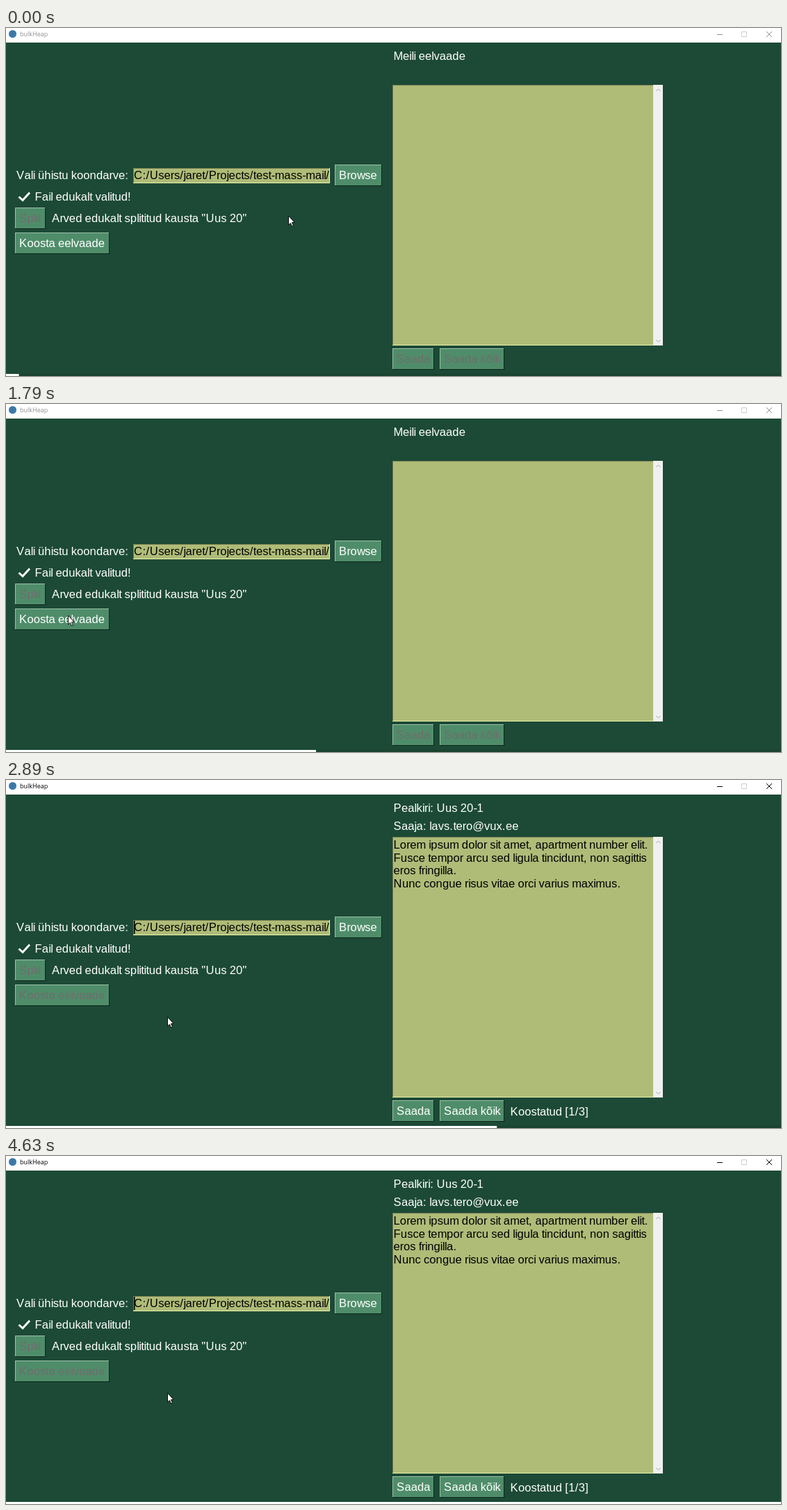
An HTML page with a canvas that plays this animation: 1115x502 px, repeating every 4.72 s.

```html
<!DOCTYPE html>
<html lang="et">
<head>
<meta charset="utf-8">
<title>bulkHeap</title>
<style>
html, body { margin: 0; width: 100%; height: 100%; overflow: hidden; background: #1c4a36; }
canvas { display: block; }
</style>
</head>
<body>
<canvas id="stage" width="1115" height="502"></canvas>
<script>
const ctx = document.getElementById('stage').getContext('2d');
const LOOP = 4720, FRAMES = 60, ZOOM = 1.035;
const FACE = '"Liberation Sans", Arial, sans-serif';
const BACK = '#1c4a36', FIELD = '#aebc78', BUTTON = '#4f8d6a', WHITE = '#fff', DISABLED = '#6d6d6d';

// Start of every seventh screen step, in ms
const GROUPS = [0, 540, 1080, 1630, 2180, 2730, 3280, 3830, 4390];
const ACTIVATE = 24, CLICK = 25, READY = 32, CARET_START = 1900;

// Pointer path: step, x, y
const PATH = [[9, 406, 271], [11, 362, 278], [14, 232, 294], [16, 168, 303], [18, 122, 306], [21, 89, 305],
  [28, 89, 305], [30, 92, 306], [31, 97, 309], [32, 118, 317], [33, 150, 327], [35, 208, 338], [37, 232, 342]];

function stepAt(time) {
  const group = GROUPS.findLastIndex(start => start <= time);
  const part = Math.min(6, Math.floor((time - GROUPS[group]) / 80));
  return { step: Math.min(FRAMES - 1, group * 7 + part), shown: GROUPS[group] + part * 80 };
}

function pointerAt(step) {
  const next = PATH.findIndex(key => key[0] > step);
  if (next === 0) return PATH[0].slice(1);
  if (next < 0) return PATH[PATH.length - 1].slice(1);
  const [s0, x0, y0] = PATH[next - 1], [s1, x1, y1] = PATH[next];
  const k = (step - s0) / (s1 - s0);
  return [x0 + (x1 - x0) * k, y0 + (y1 - y0) * k];
}

function rect(x, y, w, h, color) {
  ctx.fillStyle = color;
  ctx.fillRect(x, y, w, h);
}

function trace(points, dx = 0, dy = 0) {
  ctx.beginPath();
  points.forEach(([x, y]) => ctx.lineTo(x + dx, y + dy));
}

function line(points, color, width = 1) {
  trace(points);
  ctx.strokeStyle = color;
  ctx.lineWidth = width;
  ctx.stroke();
}

// Whole-pixel advances, as in classic desktop text: small letters and spaces run tighter
const advances = {};
function advance(char) {
  if (!(char in advances)) {
    ctx.font = `100px ${FACE}`;
    const bias = /[\p{Ll} ]/u.test(char) ? -0.1 : 0.1;
    advances[char] = Math.round(ctx.measureText(char).width * 0.16 + bias) * ZOOM;
  }
  return advances[char];
}

function write(text, x, y, color = WHITE) {
  for (const char of text) {
    const width = advance(char);
    ctx.font = `${16 * ZOOM}px ${FACE}`;
    ctx.fillStyle = color;
    ctx.fillText(char, x, y);
    x += width;
  }
}

function button(label, x, y, w, enabled) {
  rect(x, y, w, 31, '#10261b');
  rect(x, y, w - 1, 30, '#9dc0ab');
  rect(x + 1, y + 1, w - 2, 29, BUTTON);
  write(label, x + 6, y + 21, enabled ? WHITE : DISABLED);
}

function sunken(x, y, w, h) {
  rect(x, y, w, h, '#eef5a8');
  rect(x, y, w - 1, h - 1, '#737d4f');
  rect(x + 1, y + 1, w - 2, h - 2, FIELD);
}

function titleBar(active) {
  rect(0, 0, 1115, 21, WHITE);
  ctx.fillStyle = '#3b78a8';
  ctx.beginPath();
  ctx.arc(9.5, 8.5, 5.5, 0, 7);
  ctx.fill();
  const ink = active ? '#000' : '#8f8f8f';
  ctx.font = '9px "Open Sans", sans-serif';
  ctx.fillStyle = ink;
  ctx.fillText('bulkHeap', 20, 12);
  line([[1023, 9.5], [1031, 9.5]], ink);
  ctx.strokeStyle = '#cfcfcf';
  ctx.strokeRect(1058.5, 5.5, 7, 7);
  line([[1094, 5], [1102, 13]], ink);
  line([[1102, 5], [1094, 13]], ink);
}

function invoiceForm(step, caret) {
  write('Vali ühistu koondarve:', 15, 218);
  sunken(183, 202, 283, 22);
  write('C:/Users/jaret/Projects/test-mass-mail/', 184, 218, '#000');
  if (caret) rect(184, 203, 1.5, 19, '#000');
  button('Browse', 473, 197, 68, true);
  line([[18.5, 243.5], [24, 248.5], [34, 237.5]], WHITE, 3);
  write('Fail edukalt valitud!', 41.5, 249);
  button('Split', 13, 259, 44, false);
  write('Arved edukalt splititud kausta "Uus 20"', 66, 280);
  button('Koosta eelvaade', 13, 295, 136, step < CLICK);
}

function preview(ready) {
  sunken(556, 82, 376, 376);
  rect(932, 82, 13, 376, '#f0f0f0');
  line([[935.5, 91], [938.5, 88], [941.5, 91]], '#a3a3a3');
  line([[935.5, 450], [938.5, 453], [941.5, 450]], '#a3a3a3');
  button('Saada', 556, 462, 60, ready);
  button('Saada kõik', 624, 462, 93, ready);
  write(ready ? 'Pealkiri: Uus 20-1' : 'Meili eelvaade', 557.5, 46);
  if (!ready) return;
  write('Saaja: lavs.tero@vux.ee', 557.5, 72);
  ['Lorem ipsum dolor sit amet, apartment number elit.',
    'Fusce tempor arcu sed ligula tincidunt, non sagittis',
    'eros fringilla.',
    'Nunc congue risus vitae orci varius maximus.'
  ].forEach((text, row) => write(text, 557.5, Math.round(99 + row * 18.6), '#000'));
  write('Koostatud [1/3]', 725.5, 484);
}

function pointer(x, y) {
  trace([[0.5, 0], [0.5, 13], [3.4, 10.4], [5.4, 15], [7.4, 14.1], [5.4, 9.6], [9, 9.4]], x, y);
  ctx.closePath();
  ctx.fillStyle = WHITE;
  ctx.fill();
  ctx.strokeStyle = '#000';
  ctx.lineWidth = 0.9;
  ctx.stroke();
}

function draw(now) {
  const { step, shown } = stepAt(now % LOOP);
  const active = step >= ACTIVATE;
  const caret = active && (shown - CARET_START + 900) % 900 < 600;
  rect(0, 0, 1115, 502, BACK);
  ctx.lineWidth = 1;
  titleBar(active);
  invoiceForm(step, caret);
  preview(step >= READY);
  pointer(...pointerAt(step));
  rect(0, 499, 1115, 3, '#19432f');
  rect(0, 499, (step + 1) / FRAMES * 1115, 3, WHITE);
}

const began = performance.now();
function tick() {
  draw(performance.now() - began);
  requestAnimationFrame(tick);
}
tick();
</script>
</body>
</html>
```
